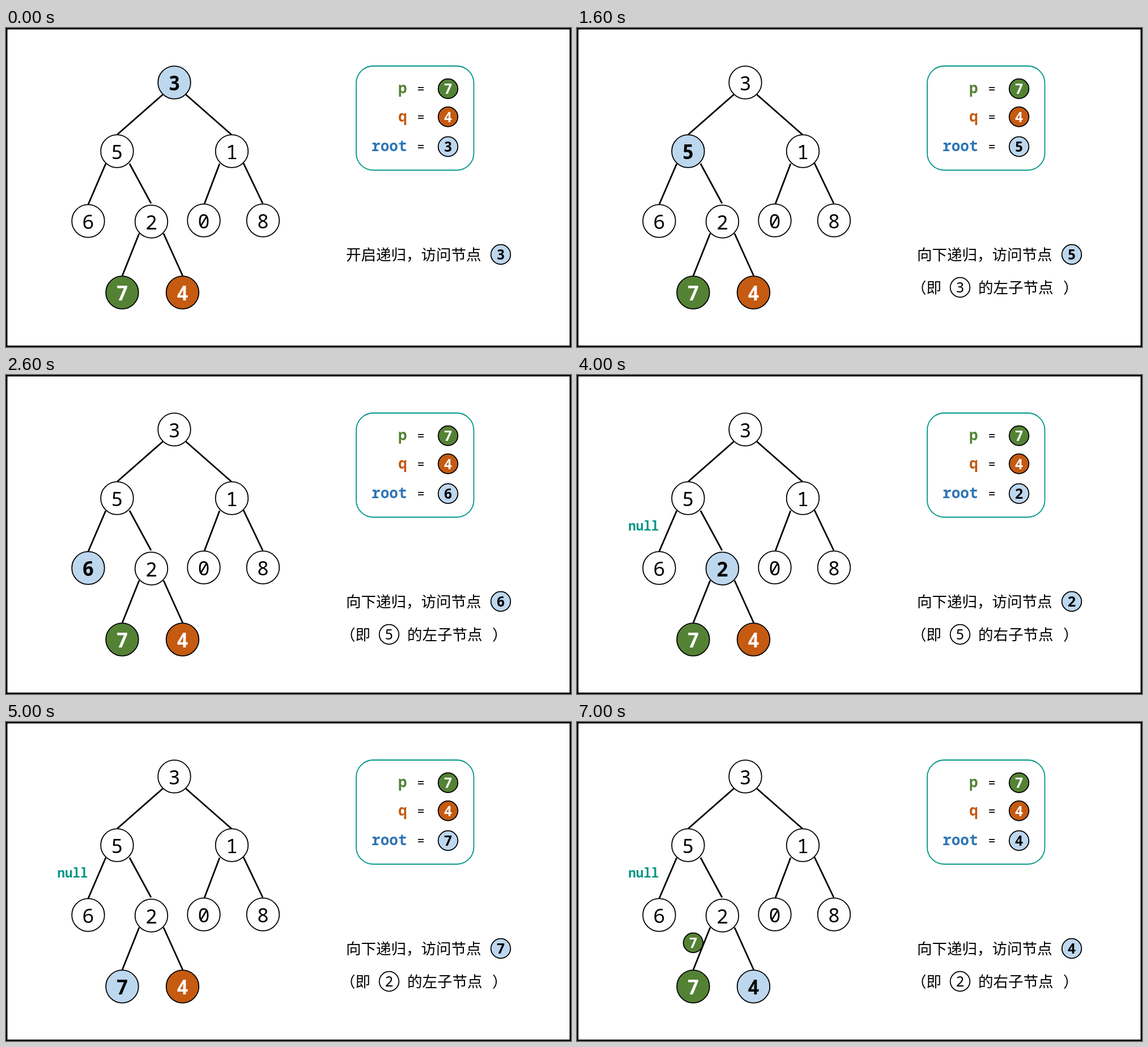
Recreate the animation shown at these times as an HTML page. Size 997 by 562 pixels, loop 8 s.

```html
<!DOCTYPE html>
<html lang="zh-CN">
<head>
<meta charset="utf-8">
<style>
  html, body { margin: 0; width: 100%; height: 100%; overflow: hidden; background: #fff; }
  svg { display: block; width: 100vw; height: 100vh; }
  .mono { font-family: "Noto Sans Mono", "DejaVu Sans Mono", monospace; }
  .bold { font-weight: 700; }
  .cjk { font: 300 26.5px "Noto Sans CJK SC", "Noto Sans CJK", sans-serif; }
</style>
</head>
<body>
<svg id="stage" viewBox="0 0 997 562"></svg>
<script>
const stage = document.getElementById('stage');
const SKY = '#bdd7ee', GREEN = '#548235', RUST = '#c55a11', BLUE = '#2e75b6', TEAL = '#009688';

const nodes = {
  3: [297, 96], 5: [196, 217], 1: [398.5, 217], 6: [145, 340], 2: [256.5, 341],
  0: [349, 339], 8: [453.5, 339], 7: [205, 466], 4: [311.5, 466]
};
const edges = 'M277 117L196 188M317 117L398 188M176 239L145 311M218 239L256 309' +
  'M377 239L350 310M419 238L453 309M235 362L205 437M278 362L312 437';
const ownFill = { 7: GREEN, 4: RUST };

const mono = (x, y, text, size, fill = '#000', bold = true, anchor = 'start') =>
  `<text class="mono${bold ? ' bold' : ''}" x="${x}" y="${y}" font-size="${size}" fill="${fill}" text-anchor="${anchor}">${text}</text>`;
const cjk = (x, y, text) => `<text class="cjk" x="${x}" y="${y}">${text}</text>`;

function disc(x, y, r, value, fill = '#fff') {
  const big = r > 20;
  const ink = fill === GREEN || fill === RUST ? '#fff' : '#000';
  return `<circle cx="${x}" cy="${y}" r="${r}" fill="${fill}" stroke="#000" stroke-width="1.8"/>` +
    mono(x, y + (big ? 13.5 : 9), value, big ? 35 : 25, ink, fill !== '#fff', 'middle');
}
const badge = (x, y, value, fill) => disc(x, y, 17.3, value, fill);

function visit(value, parent, side) {
  let out = cjk(600, 409, (parent ? '向下递归' : '开启递归') + '，访问节点') + badge(873, 399, value, SKY);
  if (parent) {
    out += cjk(590, 467, '（即') + badge(676, 457, parent) +
      cjk(708, 467, `的${side}子节点`) + cjk(858, 467, '）');
  }
  return out;
}
const giveBack = (reason, result) =>
  cjk(563, 407, '∵') + reason + cjk(563, 456, '∴') + cjk(602, 456, '终止递归，向上返回') + result;

const steps = [
  [3, visit(3)],
  [5, visit(5, 3, '左')],
  [6, visit(6, 5, '左')],
  [5, giveBack(cjk(602, 407, '越过叶节点') + badge(763, 399, 6, SKY), mono(858.5, 454, 'null', 26, TEAL))],
  [2, visit(2, 5, '右')],
  [7, visit(7, 2, '左')],
  [2, giveBack(mono(602, 406, 'root', 26, BLUE) + mono(680, 406, '=', 22, '#000', false) +
    mono(709, 406, 'p', 26, GREEN), badge(874, 446, 7, GREEN))],
  [4, visit(4, 2, '右')]
];

const legendRow = (y, name, color, value, fill) =>
  mono(707.5, y + 8, name, 26, color, true, 'end') +
  mono(732, y + 8, '=', 22, '#000', false, 'middle') + badge(780, y, value, fill);

function scene(index) {
  const [root, caption] = steps[index];
  const tree = Object.entries(nodes).map(([value, [x, y]]) =>
    disc(x, y, 28.8, value, +value === root ? SKY : ownFill[value])).join('');
  return '<rect width="997" height="562" fill="#fff"/>' +
    '<rect x="1.25" y="1.25" width="994.5" height="559.5" fill="none" stroke="#000" stroke-width="2.5"/>' +
    `<path d="${edges}" stroke="#000" stroke-width="2.8"/>` + tree +
    (index >= 3 ? mono(90.5, 274, 'null', 22.5, TEAL) : '') +
    (index >= 6 ? badge(205, 389, 7, GREEN) : '') +
    `<rect x="618" y="67" width="207.5" height="183.5" rx="30" fill="none" stroke="${TEAL}" stroke-width="1.8"/>` +
    legendRow(107, 'p', GREEN, 7, GREEN) + legendRow(156.5, 'q', RUST, 4, RUST) +
    legendRow(209, 'root', BLUE, root, SKY) + caption;
}

let shown = -1;
const start = performance.now();
function draw(now) {
  const index = Math.floor(Math.max(0, now - start) / 1000) % steps.length;
  if (index !== shown) stage.innerHTML = scene(shown = index);
  requestAnimationFrame(draw);
}
draw(start);
</script>
</body>
</html>
```
